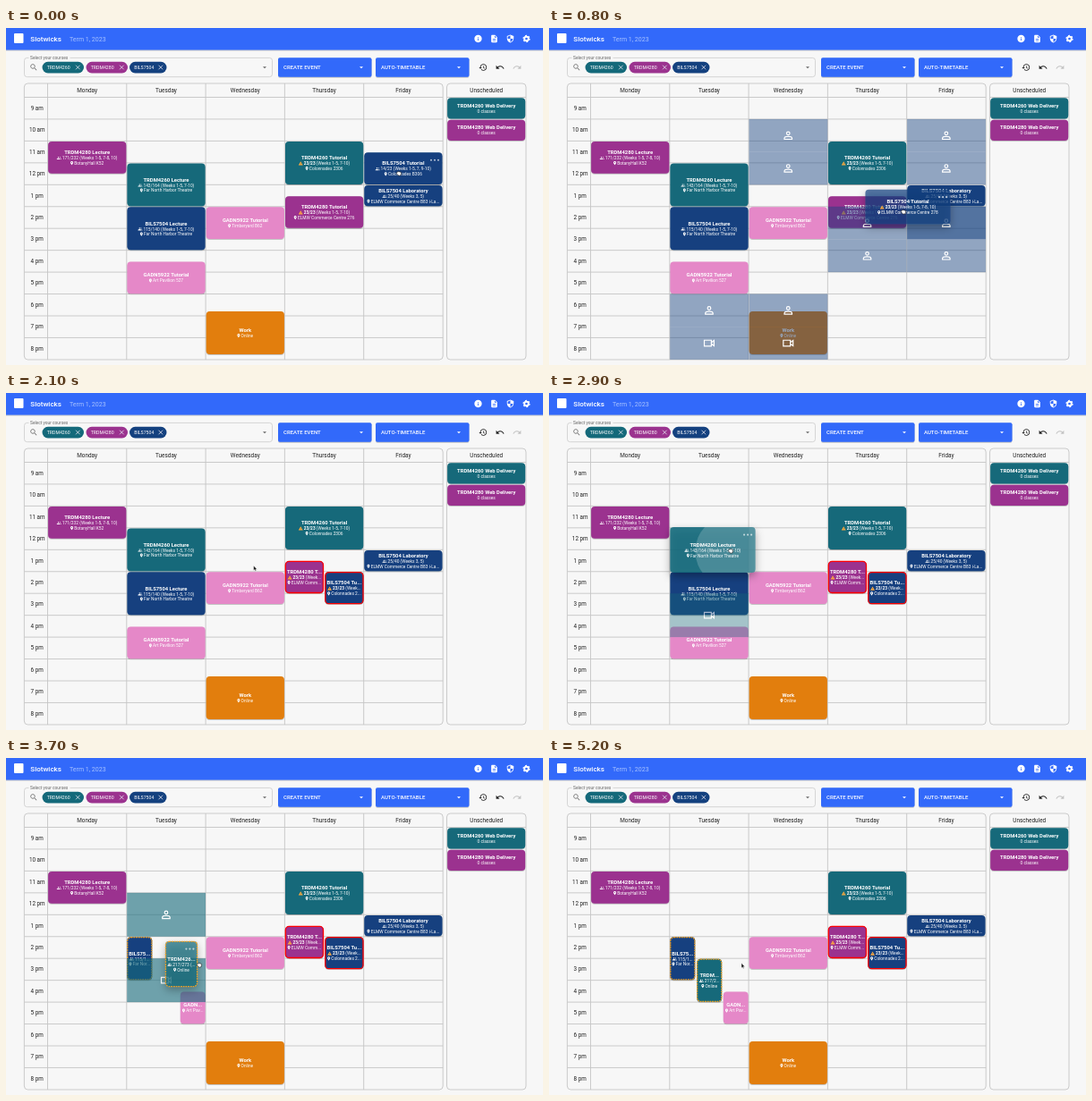
Recreate the animation shown at these times as an HTML page. Size 600x377 px, loop 5.3 s.

```html
<!DOCTYPE html>
<html lang="en">
<head>
<meta charset="utf-8">
<title>Timetable</title>
<style>
html, body { margin: 0; width: 100%; height: 100%; overflow: hidden; background: #f7f7f7; }
svg { display: block; width: 100vw; height: 100vh; font-family: Roboto, sans-serif; }
</style>
</head>
<body>
<svg id="stage" viewBox="0 0 600 377">
  <defs>
    <filter id="soft" x="-20%" y="-20%" width="140%" height="150%"><feDropShadow dx="0" dy=".6" stdDeviation=".7" flood-opacity=".35"/></filter>
    <filter id="high" x="-40%" y="-40%" width="180%" height="220%"><feDropShadow dx="0" dy="4" stdDeviation="5" flood-opacity=".4"/></filter>
    <clipPath id="face"><rect id="faceBox" rx="4"/></clipPath>
  </defs>
  <g id="page"></g>
  <g id="scene"></g>
</svg>
<script>
const $ = id => document.getElementById(id);
const LOOP = 5300, STEP = 100;
const TEAL = '#14697a', PURPLE = '#9b338f', NAVY = '#14417f', PINK = '#e588c8', ORANGE = '#e27e0c', BLUE = '#3069fa';
const LINE = '#c6c6c6', ROW = 24.45, TOP = 77.5, COL = 88.3;
const colX = d => 46.5 + d * COL;
const hourY = h => TOP + (h - 9) * ROW;

const icons = {
  info: 'M12 2C6.48 2 2 6.48 2 12s4.48 10 10 10 10-4.48 10-10S17.52 2 12 2zm1 15h-2v-6h2v6zm0-8h-2V7h2v2z',
  file: 'M14 2H6c-1.1 0-2 .9-2 2v16c0 1.1.9 2 2 2h12c1.1 0 2-.9 2-2V8l-6-6zm2 16H8v-2h8v2zm0-4H8v-2h8v2zm-3-5V3.5L18.5 9H13z',
  shield: 'M12 1L3 5v6c0 5.55 3.84 10.74 9 12 5.16-1.26 9-6.45 9-12V5l-9-4zm0 11h7c-.53 4.12-3.28 7.79-7 8.94V12H5V6.3l7-3.11V12z',
  history: 'M13 3c-4.97 0-9 4.03-9 9H1l4 4 4-4H6c0-3.87 3.13-7 7-7s7 3.13 7 7-3.13 7-7 7c-1.93 0-3.68-.79-4.94-2.06l-1.42 1.42C8.27 20 10.5 21 13 21c4.97 0 9-4.03 9-9s-4.03-9-9-9zm-1 5v5l4.28 2.54.72-1.21-3.5-2.08V8H12z',
  undo: 'M12.5 8c-2.65 0-5.05 1-6.9 2.6L2 7v9h9l-3.62-3.62c1.39-1.16 3.16-1.88 5.12-1.88 3.54 0 6.55 2.31 7.6 5.5l2.37-.78C21.08 11.03 17.15 8 12.5 8z',
  search: 'M15.5 14h-.8l-.27-.27A6.5 6.5 0 1 0 13.73 14.43l.27.28v.79l5 5 1.5-1.5-5-5zm-6 0a4.5 4.5 0 1 1 0-9 4.5 4.5 0 0 1 0 9z',
  pin: 'M12 2C8.13 2 5 5.13 5 9c0 5.25 7 13 7 13s7-7.75 7-13c0-3.87-3.13-7-7-7zm0 9.5a2.5 2.5 0 1 1 0-5 2.5 2.5 0 0 1 0 5z',
  group: 'M9 5a3 3 0 1 1 0 6 3 3 0 0 1 0-6zm7 0a3 3 0 1 1 0 6l-1-.2a5 5 0 0 0 0-5.6zM1 19v-2c0-2.5 5-4 8-4s8 1.5 8 4v2zm18 0v-2c0-1.700-.8-2.900-2-3.900 3 .4 6 1.900 6 3.900v2z',
  warn: 'M1 21h22L12 2 1 21zm12-3h-2v-2h2v2zm0-4h-2v-4h2v4z',
  arrow: 'M7 10l5 5 5-5z'
};
const outlines = {
  person: 'M12 5a3 3 0 1 1 0 6 3 3 0 0 1 0-6zM5 19v-2c0-2 4-3.100 7-3.100s7 1.100 7 3.100v2z',
  camera: 'M3 6.500h13v11H3zM16 11l5-4v10l-5-4'
};

// Drawing helpers
const rect = (x, y, w, h, r, attrs) => `<rect x="${x}" y="${y}" width="${w}" height="${h}" rx="${r}" ${attrs}/>`;
const text = (x, y, size, str, attrs = '') => `<text x="${x}" y="${y}" font-size="${size}" ${attrs}>${str}</text>`;
const place = (x, y, size) => `translate(${x - size / 2} ${y - size / 2}) scale(${size / 24})`;
const icon = (name, x, y, size, fill) => `<path d="${icons[name]}" fill="${fill}" fill-rule="evenodd" transform="${place(x, y, size)}"/>`;
const outline = (name, x, y) => `<path d="${outlines[name]}" fill="none" stroke="#fff" stroke-width="2" transform="${place(x, y, 14.5)}"/>`;
const seg = (d, color, w = .8) => `<path d="${d}" fill="none" stroke="${color}" stroke-width="${w}"/>`;
const MID = 'text-anchor="middle"';

const pen = document.createElement('canvas').getContext('2d');
function measure(str, size, weight) {
  pen.font = `${weight} 100px Roboto, sans-serif`;
  return pen.measureText(str).width * size / 100;
}
function fit(str, size, weight, max) {
  if (measure(str, size, weight) <= max) return str;
  while (str && measure(str + '...', size, weight) > max) str = str.slice(0, -1);
  return str + '...';
}

// Time helpers
const lerp = (a, b, k) => a + (b - a) * k;
function ramp(t, a, b) {
  const k = Math.min(1, Math.max(0, (t - a) / (b - a)));
  return k * k * (3 - 2 * k);
}
const pulse = (t, a, b, c, d) => ramp(t, a, b) - ramp(t, c, d);

const path = [[0, 439, 163], [200, 439, 163], [800, 396, 206], [1200, 371, 219], [1600, 371, 219],
  [2500, 203, 177], [2900, 203, 177], [3300, 237, 220], [3650, 216, 232], [LOOP, 216, 232]];
function pointer(t) {
  const i = path.findIndex(p => p[0] > t), [a, b] = [path[i - 1], path[i]];
  const k = (t - a[0]) / (b[0] - a[0]);
  return [lerp(a[1], b[1], k), lerp(a[2], b[2], k)];
}

function infoLine(sym, str, cx, y, w) {
  const warn = sym === 'warn', gap = sym === 'pin' ? 4.2 : 5.8, size = 4.85;
  str = fit(str, size, 400, w - 4 - gap - (warn ? .8 : 0));
  const x = cx - (measure(str, size, 400) + gap) / 2;
  if (warn) str = str.replace(/^\S+/, '<tspan font-weight="700">$&</tspan>');
  return icon(sym, x + gap / 2 - .6, y - 1.7, sym === 'pin' ? 5.2 : 5.3, warn ? '#ffab3d' : '#fff') + text(x + gap, y, size, str);
}

function card(c) {
  const { x, y, w, h, color, title, count, room, warn, note, edge, edgeLevel = 0, dash, dots, lift = 0, alpha = 1 } = c;
  const cx = x + w / 2, cy = y + h / 2, head = count ? -3.8 : -.9;
  let s = rect(x, y, w, h, 4, `fill="${color}" fill-opacity="${alpha}" filter="url(#${lift > .3 ? 'high' : 'soft'})"`);
  if (c.ripple) s += c.ripple;
  if (edgeLevel > .05) s += rect(x + .3, y + .3, w - .6, h - .6, 4,
    `fill="none" stroke="${edge}" stroke-width="1.3" stroke-opacity="${edgeLevel}" ${dash ? 'stroke-dasharray="1.800 .9"' : ''}`);
  s += text(cx, cy + head, 5.85, fit(title, 5.85, 700, w - 3.5), MID + ' font-weight="700"');
  if (count) s += infoLine(warn ? 'warn' : 'group', count, cx, cy + 2.3, w);
  if (room) s += infoLine('pin', room, cx, cy + (count ? 8 : 5), w);
  if (note) s += text(cx, cy + 5, 4.85, note, MID);
  if (dots) for (let i = 0; i < 3; i++) s += `<circle cx="${x + w - 12.500 + i * 4}" cy="${y + 8.500}" r="1.100" opacity=".65"/>`;
  return `<g fill="#fff">${s}</g>`;
}

const slot = (d, from, to) => ({ x: colX(d) + .6, y: hourY(from) + .6, w: COL - 1.1, h: (to - from) * ROW - 1 });

function drawPage() {
  let s = rect(0, 0, 600, 24.5, 0, `fill="${BLUE}" filter="url(#soft)"`) + rect(9, 6, 10.5, 11, 1, 'fill="#fff"');
  s += text(27.3, 15, 8, 'Slotwicks', 'fill="#fff" font-weight="500"') + text(71, 15, 7, 'Term 1, 2023', 'fill="#a9c3ff"');
  s += icon('info', 527.5, 12, 10, '#fff') + icon('file', 545.5, 12, 10, '#fff') + icon('shield', 563.5, 12, 10, '#fff');
  s += `<circle cx="581.5" cy="12" r="2.300" fill="none" stroke="#fff" stroke-width="1.900"/>
    <circle cx="581.5" cy="12" r="3.500" fill="none" stroke="#fff" stroke-width="1.300" stroke-dasharray="1.830 1.830"/>`;

  s += rect(20.5, 33.4, 277, 21.3, 3, `fill="none" stroke="${LINE}" stroke-width=".7"`) + rect(25.5, 32, 46, 3, 0, 'fill="#f7f7f7"');
  s += text(27, 34.8, 4.85, 'Select your courses', 'fill="#666"') + icon('search', 31, 44, 10, '#777') + icon('arrow', 289, 44, 9.5, '#666');
  [['TRDM4260', 40.5, 46.5, TEAL], ['TRDM4280', 89.5, 46.5, PURPLE], ['BILS7504', 138, 41.5, NAVY]].forEach(([name, x, w, color]) => {
    s += rect(x, 37.8, w, 12.6, 6.3, `fill="${color}"`) + text(x + 5.2, 45.9, 5.2, name, 'fill="#fff"');
    s += seg(`M${x + w - 9} 41.700l4.600 4.600m0 -4.600l-4.600 4.600`, '#e4e4ee', .8);
  });
  [['CREATE EVENT', 304], ['AUTO-TIMETABLE', 413]].forEach(([label, x]) => {
    s += rect(x, 33.2, 104.5, 21.6, 2, `fill="${BLUE}" filter="url(#soft)"`);
    s += text(x + 6, 46.2, 6, label, 'fill="#fff" font-weight="500"') + icon('arrow', x + 93, 44, 9.5, '#fff');
  });
  s += icon('history', 533, 44, 10, '#222') + icon('undo', 552, 44, 10.5, '#222');
  s += `<g transform="translate(1142 0) scale(-1 1)">${icon('undo', 571, 44, 10.5, '#c4c4c4')}</g>`;

  s += rect(20.4, 62, 467.8, 309, 4, `fill="none" stroke="${LINE}" stroke-width=".9"`);
  s += rect(492.5, 62, 88.5, 309, 4, `fill="none" stroke="${LINE}" stroke-width=".9"`);
  let grid = 'M492.5 77.500h88.500';
  for (let i = 0; i < 12; i++) {
    grid += `M20.4 ${TOP + i * ROW}h467.800`;
    const h = i + 9;
    s += text(34.7, TOP + (i + .5) * ROW + 2, 6.3, `${h > 12 ? h - 12 : h} ${h < 12 ? 'am' : 'pm'}`, MID + ' fill="#222"');
  }
  ['Monday', 'Tuesday', 'Wednesday', 'Thursday', 'Friday'].forEach((day, d) => {
    grid += `M${colX(d)} 62v309`;
    s += text(colX(d) + COL / 2, 72, 6.4, day, MID + ' fill="#222"');
  });
  s += text(536.7, 72, 6.4, 'Unscheduled', MID + ' fill="#222"') + seg(grid, LINE, .9);
  [['TRDM4260', 78.3, TEAL], ['TRDM4280', 102.7, PURPLE]].forEach(([name, y, color]) => {
    s += card({ x: 493.2, y, w: 87, h: 23.3, color, title: name + ' Web Delivery', note: '0 classes' });
  });
  $('page').innerHTML = s;
}

// Day, start hour, length, icon
const tutorZones = [[1, 18], [1, 19.5, 'camera'], [2, 10], [2, 11.5], [2, 18], [2, 19.5, 'camera'],
  [3, 14], [3, 15.5], [4, 10], [4, 11.5], [4, 14], [4, 15.5]];
const lectureZones = [[1, 12], [1, 15, 'camera']];

function zones(list, len, color, level, base, isTarget) {
  if (level < .02) return '';
  return `<g opacity="${level}">` + list.map(([d, h, sym = 'person']) => {
    const y = hourY(h), fillOp = isTarget(d, h) ? .72 : base;
    return rect(colX(d) + .4, y, COL - .5, len * ROW, 0, `fill="${color}" fill-opacity="${fillOp}"`) +
      outline(sym, colX(d) + COL / 2, y + len * ROW / 2);
  }).join('') + '</g>';
}

// Moves a card's centre from its resting slot to the pointer
function carry(home, w, ptr, off, held, lift) {
  const W = w + 8 * lift, H = home.h + 3 * lift;
  const cx = lerp(home.x + home.w / 2, ptr[0] - off[0], held);
  const cy = lerp(home.y + home.h / 2, ptr[1] - off[1], held);
  return { x: cx - W / 2, y: cy - H / 2, w: W, h: H };
}

function ripple(t, start, box, ptr) {
  const k = (t - start) / 500;
  if (k <= 0 || k >= 1) return '';
  for (const n in box) $('faceBox').setAttribute({ x: 'x', y: 'y', w: 'width', h: 'height' }[n], box[n]);
  return `<g clip-path="url(#face)"><circle cx="${ptr[0]}" cy="${ptr[1]}" r="${110 * k}" fill="#fff" opacity="${.28 * (1 - k)}"/></g>`;
}

function cursor(t, [x, y]) {
  const hand = t < 1500 || (t >= 2400 && t < 3900);
  return hand
    ? `<path d="M${x - 1.8} ${y - 2}q1 -1 1.800 0q1 -.8 1.700 .2q1 0 .9 1.200l-.5 2.200q-1.700 1.300 -3.200 0l-1.500 -2z" fill="#fff" stroke="#111" stroke-width=".6"/>`
    : `<path d="M${x - 1} ${y - 2.500}v5.400l1.200 -1.100 .8 1.800 .9 -.4 -.8 -1.700h1.700z" fill="#111" stroke="#fff" stroke-width=".4"/>`;
}

function render(t) {
  const ptr = pointer(t);
  const clashA = ramp(t, 1000, 1300), clashB = ramp(t, 3220, 3620);
  const levelA = pulse(t, 150, 400, 1250, 1600), levelB = pulse(t, 2700, 3050, 3700, 4000);
  const liftA = pulse(t, 150, 350, 1250, 1420), liftB = pulse(t, 2650, 2900, 3700, 3950);
  const full = COL - 1.1, half = lerp(full, 42.8, clashA), third = lerp(full, 27.8, clashB);
  const red = { edge: '#f00', edgeLevel: clashA }, amber = { edge: '#f2a024', edgeLevel: clashB, dash: true };

  const still = [
    { ...slot(0, 11, 12.5), color: PURPLE, title: 'TRDM4280 Lecture', count: '171/232 (Weeks 1-5, 7-8, 10)', room: 'BotanyHall K52' },
    { ...slot(1, 14, 16), w: third, ...amber, color: NAVY, title: 'BILS7504 Lecture', count: '115/140 (Weeks 1-5, 7-10)', room: 'Far North Harbor Theatre' },
    { ...slot(1, 16.5, 18), x: colX(1) + .6 + full - third, w: third, color: PINK, title: 'GADN5922 Tutorial', room: 'Art Pavilion 527' },
    { ...slot(2, 14, 15.5), color: PINK, title: 'GADN5922 Tutorial', room: 'Timberyard B62' },
    { ...slot(2, 9, 11), y: 317, color: ORANGE, title: 'Work', room: 'Online' },
    { ...slot(3, 11, 13), color: TEAL, title: 'TRDM4260 Tutorial', count: '23/23 (Weeks 1-5, 7-10)', warn: true, room: 'Colonnades 2306' },
    { ...slot(3, 13.5, 15), w: half, ...red, color: PURPLE, title: 'TRDM4280 Tutorial', count: '23/23 (Weeks 1-5, 7-10)', warn: true, room: 'ELMW Commerce Centre 276' },
    { ...slot(4, 13, 14), color: NAVY, title: 'BILS7504 Laboratory', count: '25/40 (Weeks 3, 5)', room: 'ELMW Commerce Centre B83 i-Lab 4' }
  ];

  const homeA = t < 700 ? slot(4, 11.5, 13) : { ...slot(3, 14, 15.5), x: 356.5, w: 42.8 };
  const boxA = carry(homeA, half, ptr, [-5, 6], pulse(t, 100, 200, 1250, 1450), liftA);
  const place = t < 500 ? ['14/23 (Weeks 1-5, 7, 9-10)', 'Colonnades B306']
    : t < 1000 ? ['23/23 (Weeks 1-5, 7-8, 10)', 'ELMW Commerce Centre 278']
    : ['23/23 (Weeks 1-5, 7-10)', 'Colonnades 2306'];
  const tutor = { ...boxA, ...red, color: NAVY, title: 'BILS7504 Tutorial', count: place[0], room: place[1], warn: t >= 500,
    dots: t < 1500, lift: liftA, alpha: 1 - .3 * levelA, ripple: ripple(t, 50, boxA, ptr) };

  const moved = t >= 3200;
  const homeB = t < 3300 ? slot(1, 12, 14) : { ...slot(1, 15, 17), x: 165.3, w: 27.8 };
  const boxB = carry(homeB, third, ptr, [20, 1.5], pulse(t, 2650, 2900, 3700, 3950), liftB);
  const lecture = { ...boxB, ...amber, color: TEAL, title: 'TRDM4260 Lecture', count: moved ? '217/273 (Weeks 1-5, 7-10)' : '143/164 (Weeks 1-5, 7-10)',
    room: moved ? 'Online' : 'Far North Harbor Theatre', dots: t >= 2500 && t < 3900, lift: liftB, alpha: 1 - .3 * levelB,
    ripple: ripple(t, 2720, boxB, ptr) };

  const aim = t < 500 ? [4, 11.5] : t < 1000 ? [4, 14] : [3, 14];
  const zoneA = zones(tutorZones, 1.5, NAVY, levelA, .45, (d, h) => t < 1250 && d === aim[0] && h === aim[1]);
  const zoneB = zones(lectureZones, 2, TEAL, levelB, .6, () => false);
  const cards = still.map(card).join('');
  const dragB = t > 2000;
  const under = t >= 1300 && t < 2000 ? zoneA : t >= 3800 ? zoneB : '';
  const over = t < 1300 ? zoneA : t > 2000 && t < 3800 ? zoneB : '';
  $('scene').innerHTML = under + cards + card(dragB ? tutor : lecture) + over + card(dragB ? lecture : tutor) + cursor(t, ptr);
}

drawPage();
const begin = performance.now();
let last = -1;
function tick() {
  const t = Math.floor((performance.now() - begin) % LOOP / STEP) * STEP;
  if (t !== last) render(last = t);
  requestAnimationFrame(tick);
}
tick();
</script>
</body>
</html>
```
